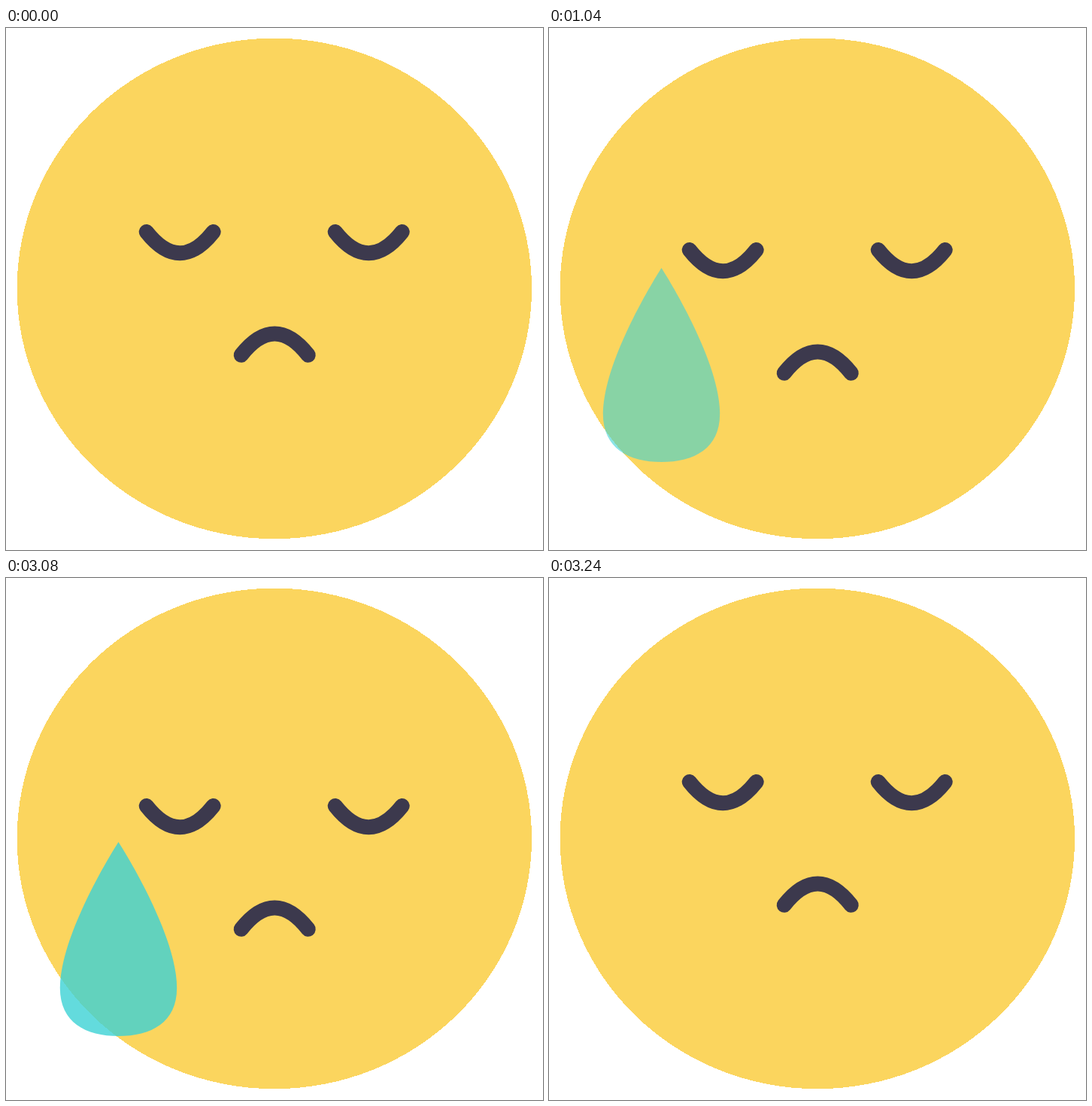
Animation of 714x694 px, one loop 3.28 s. Source, as an HTML page:

```html
<!DOCTYPE html>
<html lang="en">
<head>
<meta charset="utf-8">
<title>Sad face</title>
<style>
  html, body { margin: 0; width: 100%; height: 100%; overflow: hidden; background: #fff; }
  svg { display: block; width: 714px; height: 694px; }
</style>
</head>
<body>
<svg viewBox="0 0 714 694">
  <ellipse cx="356.8" cy="346.4" rx="342.2" ry="332.8" fill="#fbd55e" shape-rendering="crispEdges"/>
  <g id="features" fill="none" stroke="#3c394d" stroke-width="20" stroke-linecap="round">
    <path d="M186.7 271Q231.2 327.5 275.7 271"/>
    <path d="M437.7 271Q482.2 327.5 526.7 271"/>
    <path d="M312.7 434.8Q357.2 378.3 401.7 434.8"/>
  </g>
  <path id="tear" fill="#3dd3d5" opacity="0"
    d="M149.5 351C149.5 351 71.8 471 71.8 545C71.8 591 106 609 149.5 609C193 609 227.2 591 227.2 545C227.2 471 149.5 351 149.5 351Z"/>
</svg>
<script>
  const LOOP = 3280, STEP = 40, STEPS = 5;
  const features = document.getElementById('features');
  const tear = document.getElementById('tear');
  const start = performance.now();

  // Stepped 0..1 progress whose first step lands exactly at `from`
  const ramp = (t, from) =>
    Math.min(STEPS, Math.max(0, Math.floor((t - from) / STEP) + 1)) / STEPS;

  function draw(now) {
    const t = Math.max(0, now - start) % LOOP;
    const enter = ramp(t, 960);
    const shown = enter - ramp(t, 3080);
    features.setAttribute('transform', `translate(0 ${40 * shown})`);
    tear.setAttribute('transform', `translate(0 ${80 * (enter - 1)})`);
    tear.setAttribute('opacity', shown);
    requestAnimationFrame(draw);
  }
  draw(start);
</script>
</body>
</html>
```
